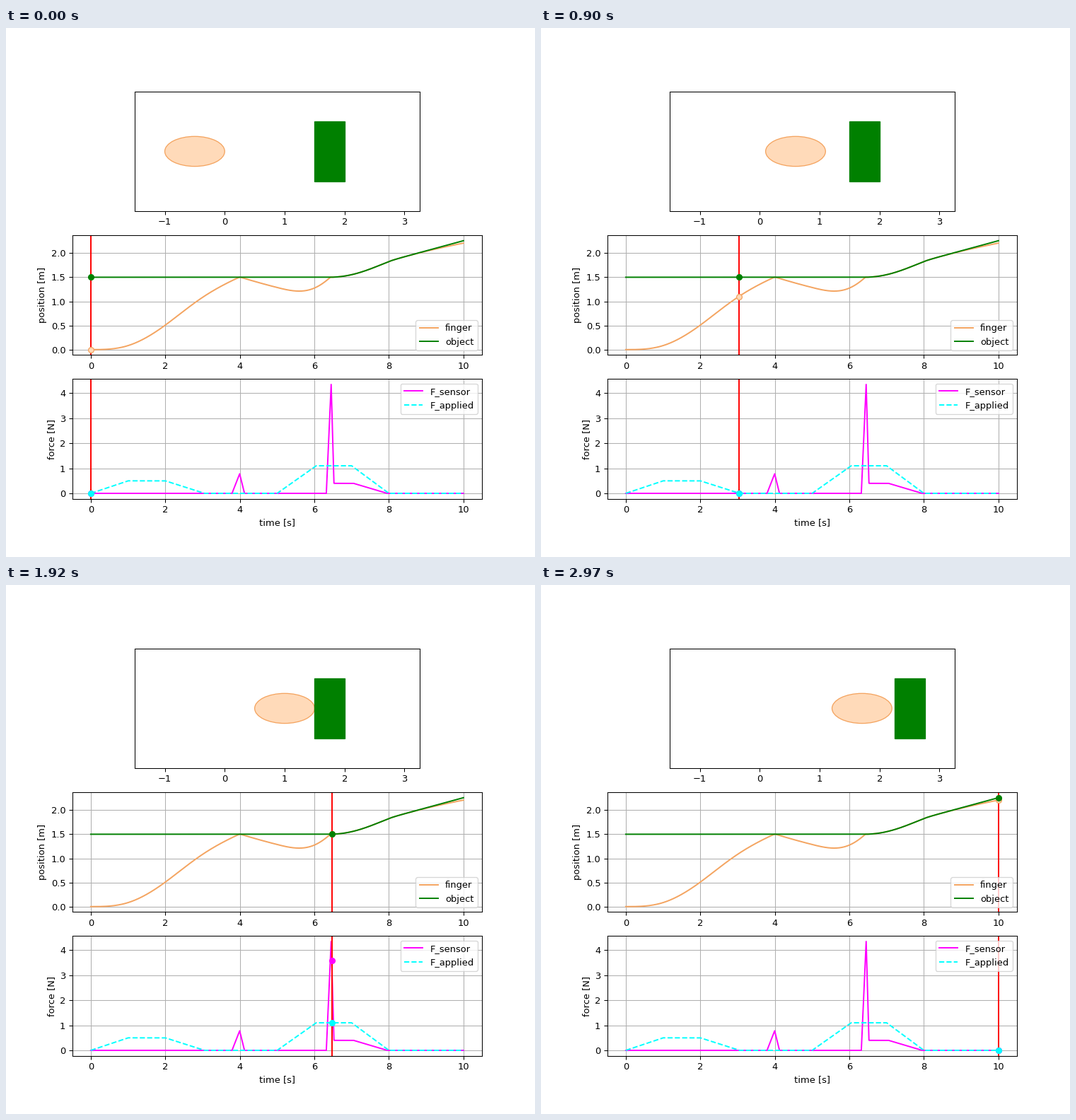
A matplotlib script for the animation above (3000 ms loop, 748 px wide and 748 px high).

```python
import numpy as np
import matplotlib.pyplot as plt
from matplotlib.animation import FuncAnimation
from matplotlib.patches import Ellipse, Rectangle

FRAMES, INTERVAL = 100, 30
DURATION, DT = 10.0, 0.005
WALL = 1.5
T_REBOUND, T_PUSH, T_COAST = 4.02, 6.45, 7.95
DRAG, REBOUND_SPEED = 0.93, 0.24
PUSH_ACCEL, DRIFT = 0.29, 0.21
SKIN, SKIN_EDGE = "peachpuff", "sandybrown"

time = np.linspace(0, DURATION, round(DURATION / DT) + 1)


def pulse(start, full, hold, end, height):
    return np.interp(time, [start, full, hold, end], [0, height, height, 0])


def spike(peak, rise, fall, height):
    return pulse(peak - rise, peak, peak, peak + fall, height)


def flight(start, x, v):
    """Finger under the applied force and quadratic drag, stopped by the block."""
    path = np.full(time.shape, x)
    for i in range(round(start / DT) + 1, len(time)):
        v += DT * (applied[i] - DRAG * v * abs(v))
        x += DT * v
        path[i] = x
        if x >= WALL:
            path[i:] = WALL
            break
    return path


# Forces
applied = pulse(0, 1, 2, 3.05, 0.5) + pulse(5, 6.05, 7, 8, 1.1)
push = pulse(T_PUSH, 6.5, 7.05, T_COAST, 1)
sensor = np.maximum.reduce([spike(3.995, 0.205, 0.13, 0.78),
                            spike(T_PUSH, 0.13, 0.083, 4.345),
                            0.4 * push])

# The block is pushed, then slows to a steady drift.
speed = (0.022 + np.cumsum(PUSH_ACCEL * push) * DT) * (time >= T_PUSH)
coast = np.maximum(time - T_COAST, 0)
speed = np.where(coast > 0, DRIFT + (speed[-1] - DRIFT) * np.exp(-coast / 0.15), speed)
block_pos = WALL + np.cumsum(speed) * DT

# The finger approaches, rebounds, then follows the block and falls behind.
lag = 0.05 * (np.maximum(time - 8.3, 0) / 1.7) ** 2
finger_pos = np.select(
    [time < T_REBOUND, time < T_PUSH],
    [flight(0, 0.0, 0.0), flight(T_REBOUND, WALL, -REBOUND_SPEED)],
    block_pos - lag)

fig, (ax_scene, ax_pos, ax_force) = plt.subplots(3, 1, figsize=(8, 8), dpi=93.5)

ax_scene.set_aspect("equal")
ax_scene.set_xlim(-1.5, 3.25)
ax_scene.set_ylim(-1, 1)
ax_scene.set_xticks(range(-1, 4))
ax_scene.set_yticks([])
finger = ax_scene.add_patch(Ellipse((-0.5, 0), 1, 0.5, fc=SKIN, ec=SKIN_EDGE))
block = ax_scene.add_patch(Rectangle((WALL, -0.5), 0.5, 1, color="green"))

ax_pos.plot(time, finger_pos, color=SKIN_EDGE, label="finger")
ax_pos.plot(time, block_pos, color="green", label="object")
ax_pos.set_ylabel("position [m]")
ax_pos.legend(loc="lower right")

ax_force.plot(time, sensor, color="magenta", label="F_sensor")
ax_force.plot(time, applied, "--", color="cyan", label="F_applied")
ax_force.set_ylabel("force [N]")
ax_force.set_xlabel("time [s]")
ax_force.legend(loc="upper right")

cursors = []
for ax in (ax_pos, ax_force):
    ax.grid(True)
    cursors.append(ax.axvline(0, color="red"))


def add_dot(ax, series, color, face=None):
    dot, = ax.plot([0], [series[0]], "o", color=color, mfc=face or color)
    return dot, series


dots = [
    add_dot(ax_pos, finger_pos, SKIN_EDGE, SKIN),
    add_dot(ax_pos, block_pos, "green"),
    add_dot(ax_force, sensor, "magenta"),
    add_dot(ax_force, applied, "cyan"),
]


def update(frame):
    t = DURATION * frame / (FRAMES - 1)
    finger.set_center((np.interp(t, time, finger_pos) - 0.5, 0))
    block.set_x(np.interp(t, time, block_pos))
    for cursor in cursors:
        cursor.set_xdata([t, t])
    for dot, series in dots:
        dot.set_data([t], [np.interp(t, time, series)])
    return [finger, block, *cursors, *(dot for dot, _ in dots)]


anim = FuncAnimation(fig, update, frames=FRAMES, interval=INTERVAL,
                     repeat=True, repeat_delay=0)
plt.show()
```
